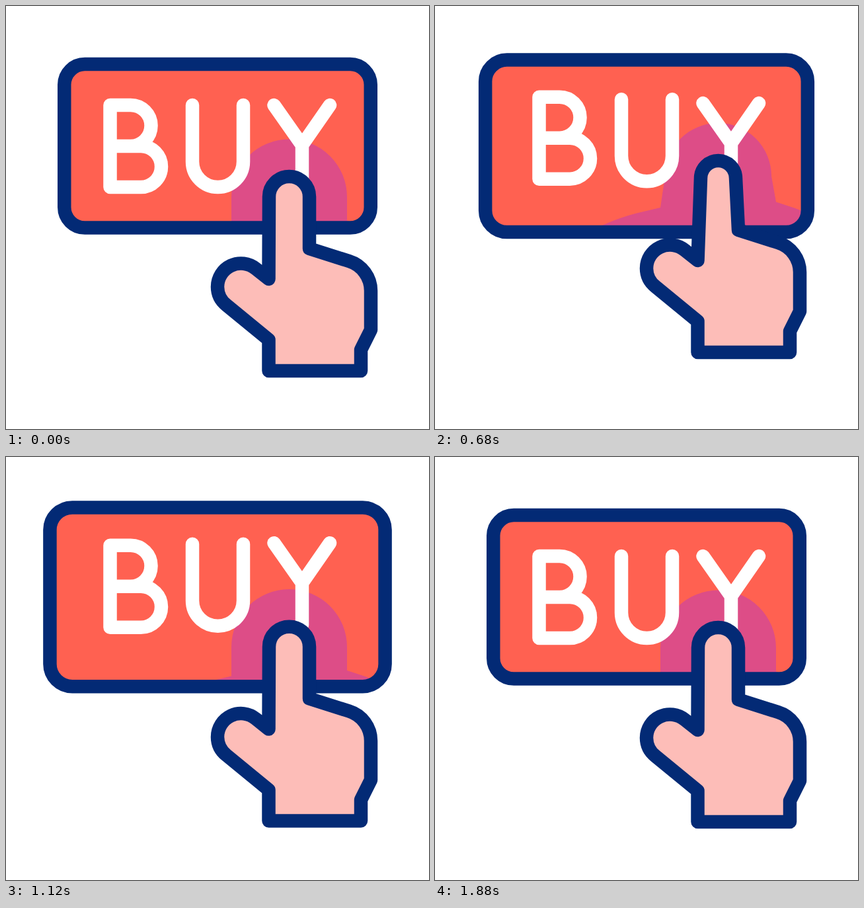
An HTML page for the animation above (1.92 s loop, 640 px wide and 640 px high).

```html
<!DOCTYPE html>
<html lang="en">
<head>
<meta charset="utf-8">
<title>Buy button</title>
<style>
  html, body { margin: 0; width: 100%; height: 100%; overflow: hidden; background: #fff; }
  svg { display: block; width: 100vw; height: 100vh; }
  .line { stroke: #032a75; stroke-width: 20.5; stroke-linejoin: round; }
  .letter { fill: none; stroke: #fff; stroke-width: 20.5; stroke-linecap: round; stroke-linejoin: round; }
</style>
</head>
<body>
<svg viewBox="0 0 640 640" role="img" aria-label="BUY">
  <clipPath id="face"><rect class="box"/></clipPath>
  <rect class="box" fill="#ff6151"/>
  <path id="shade" fill="#dd4d87" clip-path="url(#face)"/>
  <path class="letter" d="M204 212H157.5V150H188.5A31 31 0 0 1 188.5 212H204A31 31 0 0 1 204 274H157.5V212"/>
  <path class="letter" d="M282 150V235.5A38.5 38.5 0 0 0 359 235.5V150"/>
  <path class="letter" d="M405.5 150L448 210.5L490 150M448 210.5V274"/>
  <rect class="box line" fill="none"/>
  <path id="hand" class="line" fill="#fdbdb8"/>
</svg>
<script>
  const LOOP = 1920, STEP = 40;
  const boxes = document.querySelectorAll('.box');
  const letters = document.querySelectorAll('.letter');
  const hand = document.getElementById('hand');
  const shade = document.getElementById('shade');

  // Each pulse rises between the first two times and falls between the last two.
  const BUTTON = [340, 980, 1080, 1730];
  const PRESS = [50, 580, 672, 1195];
  const SQUASH = [280, 600, 680, 1000];
  const LETTERS = [
    [355, 915, 968, 1511],
    [421, 978, 1019, 1590],
    [540, 1100, 1150, 1710]
  ];

  function ease(t, from, to) {
    const u = Math.min(1, Math.max(0, (t - from) / (to - from)));
    return (1 - Math.cos(Math.PI * u)) / 2;
  }

  const pulse = (t, [a, b, c, d]) => ease(t, a, b) - ease(t, c, d);

  function setBox(grow) {
    const k = 1 + 0.095 * grow;
    const w = 463.5 * k, h = 247.5 * k;
    const attrs = { x: 320 - w / 2, y: 211.8 - h / 2, width: w, height: h, rx: 31 * k };
    for (const box of boxes)
      for (const name in attrs) box.setAttribute(name, attrs[name]);
  }

  function handPath(squash) {
    const r = 30.5 - 4 * squash;
    const y = 288.5;
    const tip = y + 4 * squash - (30.5 - r);
    return `M397.5 413L${428.5 - r} ${tip}A${r} ${r} 0 0 1 ${428.5 + r} ${tip}L459 367
      L519 386A47 47 0 0 1 552 431V490L537 520V552H397.5V505L333.5 452.5
      A35.5 35.5 0 0 1 320 425A35.5 35.5 0 0 1 378 397.5Z`;
  }

  function shadePath(squash) {
    const r = 87.5 - 7 * squash;
    const y = 289 + 3.5 * squash - (87.5 - r);
    return `M341 333L${428.5 - r} ${y}A${r} ${r} 0 0 1 ${428.5 + r} ${y}L516 324.5
      L545 334Q565 341 580 354V420H240V366Q272 350 305 341.5Z`;
  }

  function draw(t) {
    const squash = pulse(t, SQUASH);
    const lift = `translate(0 ${-28 * pulse(t, PRESS)})`;
    setBox(pulse(t, BUTTON));
    letters.forEach((el, i) => {
      el.setAttribute('transform', `translate(0 ${-19.8 * pulse(t, LETTERS[i])})`);
    });
    hand.setAttribute('d', handPath(squash));
    hand.setAttribute('transform', lift);

    // The clip must stay with the button, so the lift is baked into the points.
    shade.setAttribute('d', shiftY(shadePath(squash), -28 * pulse(t, PRESS)));
  }

  function shiftY(d, dy) {
    return d.replace(/([A-Z])([^A-Z]*)/g, (all, cmd, args) => {
      if (cmd === 'Z' || cmd === 'H') return all;
      const n = args.trim().split(/\s+/).map(Number);
      const moved = cmd === 'V' ? [n[0] + dy]
        : cmd === 'A' ? [...n.slice(0, 6), n[6] + dy]
        : n.map((v, i) => i % 2 ? v + dy : v);
      return cmd + moved.join(' ');
    });
  }

  const start = performance.now();
  function tick() {
    const t = (performance.now() - start) % LOOP;
    draw(Math.floor(t / STEP) * STEP);
    requestAnimationFrame(tick);
  }
  tick();
</script>
</body>
</html>
```
